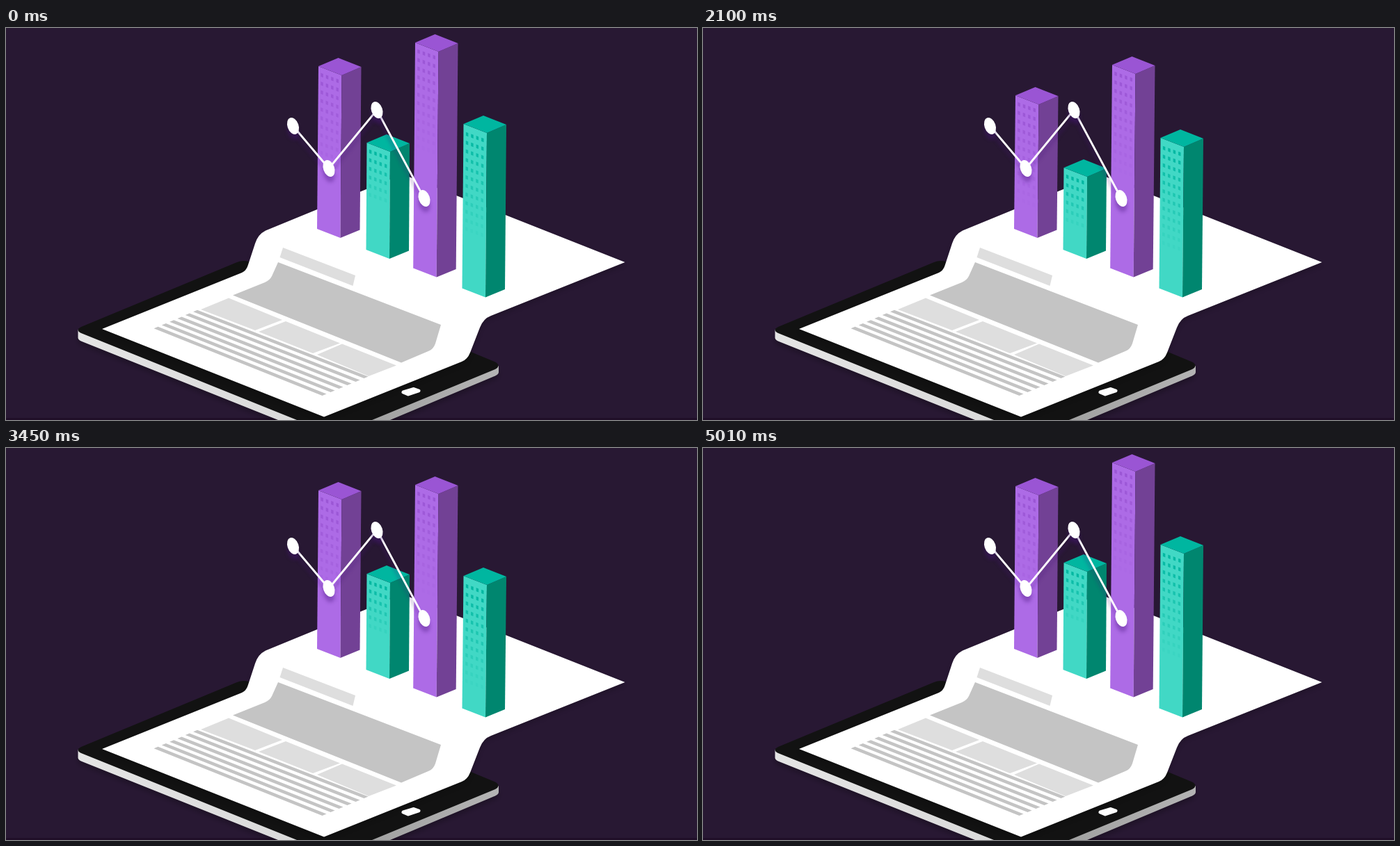
Write an HTML page with a canvas that moves like this. It is 993 px wide and 564 px high and loops after 5040 ms.

```html
<!DOCTYPE html>
<html lang="en">
<head>
<meta charset="utf-8">
<title>Isometric bar chart</title>
<style>
html, body { margin: 0; width: 100%; height: 100%; overflow: hidden; background: #281833; }
canvas { display: block; }
</style>
</head>
<body>
<canvas id="stage" width="993" height="564"></canvas>
<script>
const ctx = document.getElementById('stage').getContext('2d');
const LOOP = 5040;

const PURPLE = { left: '#ad6be6', top: '#9a55d4', right: '#724195' };
const TEAL = { left: '#41d8c5', top: '#00b6a0', right: '#00866f' };

// top and base: left corners of the upper and lower faces;
// move: start, lowest point and end in ms; drop: travel in px
const bars = [
  { top: [449, 55], base: [447, 289], skin: PURPLE, move: [60, 1810, 3670], drop: 50, rows: 12, inset: 13 },
  { top: [518.5, 165], base: [517.5, 319], skin: TEAL, move: [402, 2285, 4245], drop: 40, rows: 6, inset: 13 },
  { top: [588, 21], base: [585.2, 345.5], skin: PURPLE, move: [858, 2775, 4692], drop: 50, rows: 12, inset: 13 },
  { top: [657.5, 138], base: [655.5, 374.5], skin: TEAL, move: [1320, 3300, 5045], drop: 50, rows: 12, inset: 15 }
];

const nodes = [[412.5, 141], [464, 202], [533, 118], [601, 245]];

function poly(fill, ...points) {
  ctx.fillStyle = fill;
  ctx.beginPath();
  points.forEach(p => ctx.lineTo(...p));
  ctx.fill();
}

function shape(fill, path) {
  ctx.fillStyle = fill;
  ctx.fill(new Path2D(path));
}

function shade(x0, c0, x1, c1) {
  const g = ctx.createLinearGradient(x0, 0, x1, 0);
  g.addColorStop(0, c0);
  g.addColorStop(1, c1);
  return g;
}

function withShadow(color, dy, blur, draw) {
  ctx.save();
  ctx.shadowColor = color;
  ctx.shadowOffsetY = dy;
  ctx.shadowBlur = blur;
  draw();
  ctx.restore();
}

function drawTablet() {
  withShadow('rgba(0,0,0,.25)', 5, 7, () =>
    shape(shade(104, '#e4e4e4', 420, '#dadada'),
      'M103.5 434V446Q104 449 109 451L391 564H470V500Z'));
  withShadow('rgba(0,0,0,.25)', 5, 7, () =>
    shape(shade(530, '#a2a2a2', 708, '#b4b4b4'),
      'M708 486V495Q708 498 703 500.5L552 564H470V500Z'));
  shape('#121212', 'M108 430L332 337Q340 333.5 349 336L668 466L703 480.5' +
    'Q712 486 703 491L526 564H418L108 439Q99 434.500 108 430Z');
  ctx.lineJoin = 'round';
  ctx.lineWidth = 5;
  ctx.strokeStyle = '#fff';
  const button = new Path2D('M571 524L586 519.500L593 522L578 527Z');
  ctx.stroke(button);
  shape('#fff', 'M571 524L586 519.500L593 522L578 527Z');
}

function drawPaper() {
  withShadow('rgba(0,0,0,.18)', 4, 6, () =>
    shape('#fff', 'M138 433L339 352Q345 349.500 347.500 342L358 310Q362 297 373 291.500' +
      'L570 210.500L889.500 337L697 414Q686 418 681 431L667 467Q663 477 655 480L457 559.500Z'));

  const pale = '#dedede', grey = '#c4c4c4';
  poly(pale, [398, 316], [502, 356], [498.5, 371], [393.5, 330]);
  shape(grey, 'M391 337L625 427L617 454Q614 462 608 464.500L568 481.500' +
    'L326 384.500L372 366Q379 363 382 357Z');
  poly(pale, [280, 405], [320, 388.5], [397, 420], [358, 435]);
  poly(pale, [363, 437], [402, 422], [480, 453.5], [441, 468]);
  poly(pale, [447, 470], [483, 454.5], [561, 485.5], [521, 501]);
  for (let i = 0; i < 6; i++) {
    const x = 212.5 + 11.3 * i, y = 432.3 - 4.8 * i;
    const u = 454.5 + 12 * i, v = 529 - 5 * i;
    poly(grey, [x, y], [x + 6, y - 2.5], [u + 6, v - 2.5], [u, v]);
  }
}

function offset(bar, t) {
  const [start, low, end] = bar.move;
  const k = Math.min((t - start) / (low - start), (end - t) / (end - low));
  return Math.round(bar.drop * Math.max(0, k));
}

function drawBar(bar, t) {
  const { skin, rows, inset, base: [bx, by] } = bar;
  const x = bar.top[0], y = bar.top[1] + offset(bar, t);
  const front = [x + 33.5, y + 13], right = [x + 61.5, y + 1];
  const foot = [bx + 33.5, by + 13];
  poly(skin.left, [x, y], front, foot, [bx, by]);
  poly(skin.right, front, right, [bx + 61.5, by + 1.5], foot);
  poly(skin.top, [x, y], [x + 28.5, y - 12], right, front);

  for (let r = 0; r < rows; r++) {
    ctx.globalAlpha = 0.95 * (1 - r / rows);
    for (let c = 0; c < 4; c++) {
      const wx = x + 3.4 + 7.4 * c - 0.08 * r;
      const wy = y + inset - 3.3 + 2.7 * c + 12.4 * r;
      poly(skin.top, [wx, wy], [wx + 3.4, wy + 1.3], [wx + 3.4, wy + 6.5], [wx, wy + 5.2]);
    }
  }
  ctx.globalAlpha = 1;
}

function drawTrend() {
  const path = new Path2D();
  nodes.forEach(p => path.lineTo(...p));
  withShadow('rgba(70,20,120,.35)', 8, 5, () => {
    ctx.strokeStyle = '#fff';
    ctx.lineWidth = 2.8;
    ctx.stroke(path);
    ctx.fillStyle = '#fff';
    ctx.beginPath();
    for (const [x, y] of nodes) {
      const dot = new Path2D();
      dot.ellipse(x, y, 8, 12.3, -0.33, 0, 2 * Math.PI);
      ctx.fill(dot);
    }
  });
}

function frame(now) {
  const t = now % LOOP;
  ctx.fillStyle = '#281833';
  ctx.fillRect(0, 0, 993, 564);
  ctx.fillStyle = '#200f28';
  ctx.fillRect(0, 561, 993, 3);
  drawTablet();
  drawPaper();
  bars.forEach(bar => drawBar(bar, t));
  drawTrend();
  requestAnimationFrame(frame);
}
requestAnimationFrame(frame);
</script>
</body>
</html>
```
